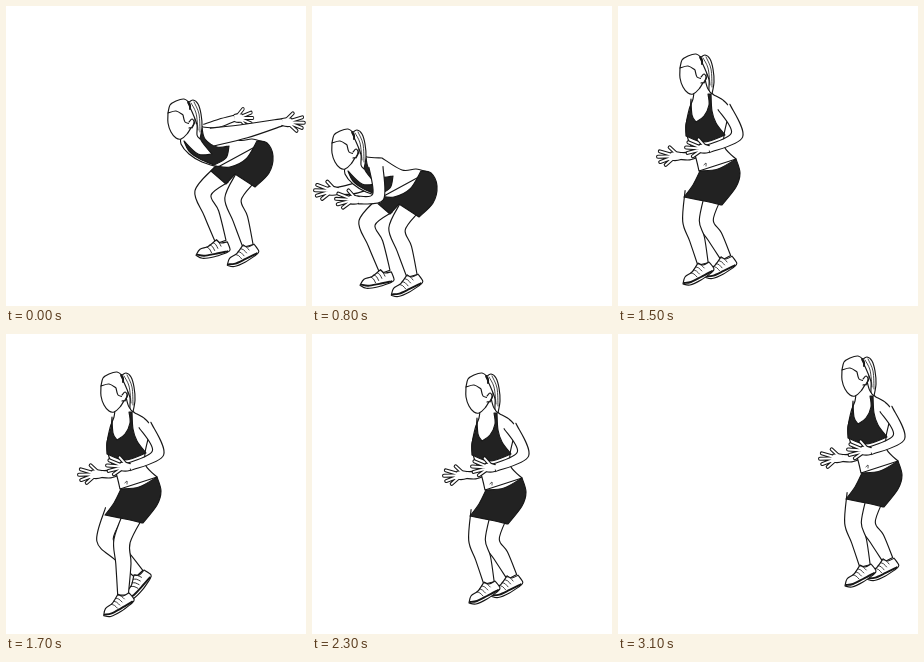
Animation, 300 px wide and 300 px high, one loop 3300 ms. Source, as an HTML page:

```html
<!DOCTYPE html>
<html lang="en">
<head>
<meta charset="utf-8">
<title>Broad jump and shuffle back</title>
<style>
html, body { margin: 0; width: 100%; height: 100%; overflow: hidden; background: #fff; }
svg { display: block; width: 100%; height: 100%; }
path { fill: none; stroke: #161616; stroke-width: 1.15; stroke-linecap: round; stroke-linejoin: round; }
.skin { fill: #fff; }
.cloth { fill: #222; }
.thin { stroke-width: .8; }
.bold { stroke-width: 1.9; }
.tip { stroke-width: 4; }
.gap { stroke: #fff; stroke-width: 1.9; }
</style>
</head>
<body>
<svg id="stage" viewBox="0 0 300 300"></svg>
<script>
// Smooth curve through points; "|" marks a corner.
function curve(text) {
  let d = "", last = null;
  for (const part of text.split("|")) {
    const p = part.trim().split(/\s+/).map(s => s.split(",").map(Number));
    if (last) p.unshift(last);
    else d = "M" + p[0];
    for (let i = 0; i < p.length - 1; i++) {
      const a = p[i - 1] || p[i], b = p[i], c = p[i + 1], e = p[i + 2] || c;
      const c1 = b.map((v, k) => (v + (c[k] - a[k]) / 6).toFixed(2));
      const c2 = c.map((v, k) => (v - (e[k] - b[k]) / 6).toFixed(2));
      d += `C${c1} ${c2} ${c}`;
    }
    last = p[p.length - 1];
  }
  return d;
}

const path = (cls, d) => `<path class="${cls}" d="${d}"/>`;
const draw = cls => points => path(cls, curve(points));
const [skin, cloth, thin, bold] = ["skin", "cloth", "thin", "bold"].map(draw);

const group = (transform, body) => `<g transform="${transform}">${body}</g>`;
const at = ([x, y], turn, body, flip = 1) =>
  group(`translate(${x} ${y}) rotate(${turn}) scale(${flip} 1)`, body);

// Outline around a chain of joints, each with its half width.
function limb(joints, widths) {
  const side = sign => joints.map(([x, y], i) => {
    const a = joints[i - 1] || joints[i], b = joints[i + 1] || joints[i];
    const dx = b[0] - a[0], dy = b[1] - a[1], k = sign * widths[i] / Math.hypot(dx, dy);
    return `${(x - dy * k).toFixed(1)},${(y + dx * k).toFixed(1)}`;
  });
  const [end, ...back] = side(-1).reverse();
  return skin(`${side(1).join(" ")}|${end}|${back.join(" ")}`);
}

// Wrist at the origin, fingers fanned out to the left.
function hand() {
  let fingers = "M-4-3L-10-9";
  for (let i = -1; i <= 2; i++) {
    const a = i * .26, len = 22 - 1.3 * i * i;
    fingers += `M-7 ${i}L${-len * Math.cos(a)} ${len * Math.sin(a)}`;
  }
  return path("tip", fingers) + path("skin", "M1-3.5Q-5-5-9-4Q-11 0-8 4Q-4 5 1 3.5") + path("gap", fingers);
}

// Ankle at the origin, toe to the lower left.
function shoe() {
  let laces = "";
  for (let i = 0; i < 4; i++) {
    const x = -12 + 2.4 * i, y = 9 - 3 * i;
    laces += thin(`${x},${y} ${x + 3},${y + 1} ${x + 6},${y + 4}`);
  }
  return skin("-20,20 -18,13 -11,8 -5,-1|0,1 6,-2|11,5 8,9|-2,16 -13,21 -20,20") +
    bold("-19,19 -12,18 -2,13 9,7") + laces;
}

function leg(hip, knee, ankle, turn) {
  const calf = knee.map((v, k) => v + .42 * (ankle[k] - v) + (k ? 0 : 1));
  return limb([hip, knee, calf, ankle], [10, 8.3, 7.6, 5.3]) + at(ankle, turn, shoe());
}

function arm(joints, widths, turn, flip) {
  return limb(joints, widths) + at(joints[joints.length - 1], turn, hand(), flip);
}

function head(x, y, swing) {
  const tail = skin("174,43 179,40 184,44 187,54 188,67 186,79|183,75 183,65 179,54 174,43") +
    thin("177,43 182,53 184,70") + thin("180,42 185,54 186,72") + bold("174,42 176,45 176,49");
  return group(`translate(${x} ${y})`,
    skin("154,53 154,63 157,72 162,78 167,79 173,74 178,66") +
    skin("154,53 156,45 162,41 170,39 176,43|180,50 181,61 178,68|176,64 171,62 169,55|162,51 154,53") +
    skin("175,62 178,59 180,62 178,67 175,68") +
    group(`rotate(${swing} 175 43)`, tail));
}

const chest =
  skin("168,76 167,84 163,95 160,112 162,124 169,140 173,156|210,144|199,133 198,120 203,95 198,86 188,80|182,74 179,64") +
  cloth("165,84 164,95 160,109 160,121|178,127 199,120|190,108 186,96 185,79|182,79|183,90 178,101 170,107|166,100 165,84") +
  thin("178,150 180,148 180,151");

const torso =
  arm([[172, 137], [163, 141], [154, 141]], [5, 4, 3.5], -2) + chest +
  cloth("174,156 192,154 210,144|214,158 210,172 196,190|178,186 158,182|167,170 174,156") +
  arm([[198, 92], [211, 120], [182, 134]], [6.5, 6, 4], 4) +
  head(0, 0, 0);

const close =
  leg([168, 178], [158, 207], [192, 241], -20) +
  leg([187, 180], [175, 208], [176, 262], -2) + torso;

const wide =
  leg([185, 182], [179, 206], [200, 243], 2) +
  leg([169, 177], [165, 206], [177, 249], 0) + torso;

const jump =
  arm([[144, 90], [128, 91], [108, 93]], [5, 5, 3.5], 0) +
  leg([179, 143], [180, 178], [190, 231], -11) +
  leg([160, 140], [150, 178], [153, 228], -13) +
  group("translate(-27 -37) rotate(-8 186 85)", chest) +
  cloth("154,119 175,119 193,110|199,122 198,134 189,152|170,148 151,143|156,131 154,119") +
  arm([[170, 55], [181, 88], [151, 92]], [6.5, 6, 4], 15) +
  head(-29, -34, -39);

const squat = (farArm, nearArm) =>
  farArm +
  leg([239, 172], [227, 193], [242, 240], 2) +
  leg([215, 169], [197, 187], [215, 236], 17) +
  skin("175,130 175,138 183,148 196,156 212,161|258,136|246,133 232,134 212,122|197,121 190,117") +
  cloth("210,160 224,161 240,153 251,135|261,137 267,150 263,167 249,181|229,168|220,178|205,165|210,160") +
  cloth("178,135 183,145 194,153 208,159|220,152 223,140|211,141 199,133 196,122|193,122|195,134 206,148|192,148 178,135") +
  nearArm + head(8, 54, 0);

const poses = {
  crouch: squat(
    arm([[199, 122], [214, 117], [229, 112]], [4, 4, 3], 0, -.8),
    arm([[206, 131], [240, 125], [277, 116]], [9, 7, 3.5], 2, -.95)),
  jump,
  land: squat(
    arm([[196, 148], [182, 153], [167, 155]], [6, 5, 3.5], 2),
    arm([[206, 131], [208, 161], [188, 164]], [7, 6, 4], 3)),
  close,
  wide
};

// Each shuffle stride starts at a key place and ends 19 further right.
const strides = [[-111, 9], [-59, -1], [-19, 0], [6, -13], [51, -17]];
const LOOP = 3300, LANDED = 1300, STEP = 200;

function scene(ms) {
  if (ms < 500) return ["crouch", 0, 0];
  if (ms < 800) return ["jump", 0, 0];
  if (ms < LANDED) return ["land", -142, 30];
  const step = Math.floor((ms - LANDED) / STEP), open = step % 2;
  const [x, y] = strides[step >> 1];
  return [open ? "wide" : "close", x + 19 * open, y];
}

const stage = document.getElementById("stage");
stage.innerHTML = Object.entries(poses)
  .map(([name, body]) => `<g id="${name}">${body}</g>`).join("");

function show(ms) {
  const [pose, x, y] = scene(ms);
  for (const g of stage.children) {
    g.setAttribute("visibility", g.id === pose ? "visible" : "hidden");
    g.setAttribute("transform", `translate(${x} ${y})`);
  }
}

const start = performance.now();
function tick() {
  show((performance.now() - start) % LOOP);
  requestAnimationFrame(tick);
}
tick();
</script>
</body>
</html>
```
